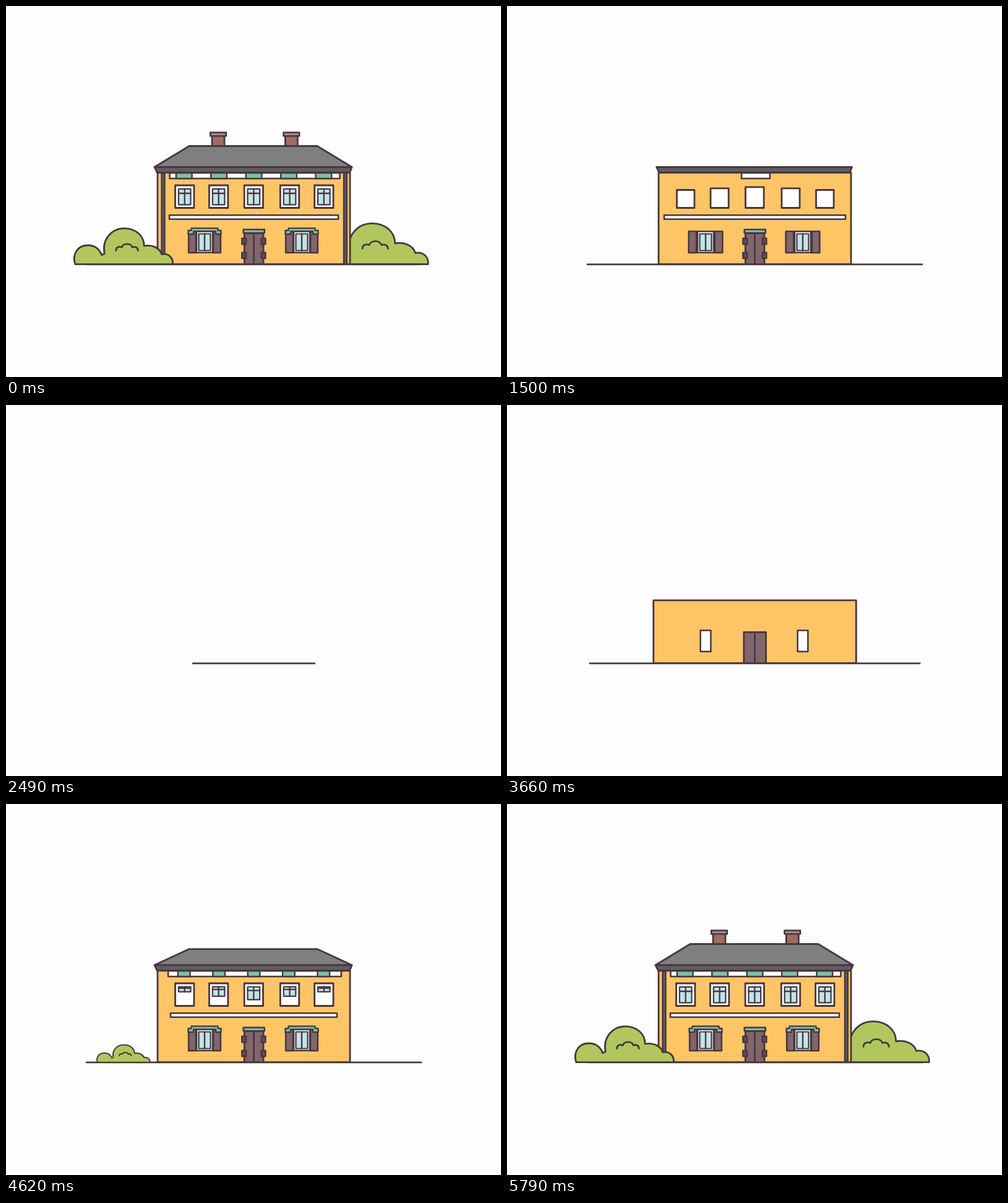
An HTML page with a canvas that plays this animation: 800 px wide and 600 px high, repeating every 5.82 s.

```html
<!DOCTYPE html>
<html lang="en">
<head>
<meta charset="utf-8">
<title>House</title>
<style>
  html, body { margin: 0; width: 100%; height: 100%; overflow: hidden; background: #fefefe; }
  canvas { display: block; width: 800px; height: 600px; }
</style>
</head>
<body>
<canvas id="stage" width="800" height="600"></canvas>
<script>
const ctx = document.getElementById('stage').getContext('2d');
const LOOP = 5820, FRAME = 30, LAST = LOOP - FRAME;
const MID = 400.5, GROUND = 417.7;
const C = {
  ink: '#463740', wall: '#fdc566', roof: '#7f7f7f', eave: '#615c61', white: '#fff',
  mint: '#7ac4a9', leaf: '#b1c75d', wood: '#83656c', iron: '#5e4b55',
  glass: '#c1e4e9', brick: '#a16d60', cap: '#a4878c'
};

// Easing
const clamp = u => Math.max(0, Math.min(1, u));
const sineOut = u => Math.sin(u * Math.PI / 2);
const sineInOut = u => (1 - Math.cos(u * Math.PI)) / 2;
const cubicInOut = u => u < .5 ? 4 * u ** 3 : 1 - 4 * (1 - u) ** 3;
const span = (t, from, to, ease = sineOut) => ease(clamp((t - from) / (to - from)));

// Steps [time, value]: a quick first move, then soft swings
function swing(t, ...steps) {
  if (t <= steps[0][0]) return steps[0][1];
  for (let i = 1; i < steps.length; i++) {
    const [t0, a] = steps[i - 1], [t1, b] = steps[i];
    if (t < t1) return a + (b - a) * span(t, t0, t1, i === 1 ? sineOut : sineInOut);
  }
  return steps[steps.length - 1][1];
}

// Drawing: the shape follows the transform, the line weight does not
function paint(fill, weight) {
  ctx.save();
  ctx.setTransform(1, 0, 0, 1, 0, 0);
  if (fill) { ctx.fillStyle = fill; ctx.fill(); }
  if (weight) { ctx.lineWidth = weight; ctx.stroke(); }
  ctx.restore();
}
function box(x0, y0, x1, y1, fill, weight = 2.8) {
  ctx.beginPath();
  ctx.rect(x0, y0, x1 - x0, y1 - y0);
  paint(fill, weight);
}
function poly(points, fill, weight = 2.8, open) {
  ctx.beginPath();
  points.forEach(([x, y]) => ctx.lineTo(x, y));
  if (!open) ctx.closePath();
  paint(fill, weight);
}
const line = (x0, y0, x1, y1, weight) => poly([[x0, y0], [x1, y1]], null, weight, true);
function grow(x, y, sx, sy, draw) {
  if (sx < .005 || sy < .005) return;
  ctx.save();
  ctx.translate(x, y);
  ctx.scale(sx, sy);
  ctx.translate(-x, -y);
  draw();
  ctx.restore();
}

// Bush around x = 0 on the ground line
function bush(x, size, sx, sy) {
  if (sx <= 0) return;
  const weight = 2.8 * Math.min(1, .4 + .6 * sx);
  ctx.save();
  ctx.translate(x, GROUND);
  ctx.scale(size * sx, size * sy);
  ctx.translate(-189.5, -GROUND);
  ctx.beginPath();
  ctx.moveTo(111.5, GROUND);
  ctx.bezierCurveTo(106, 400, 117, 387, 132, 387);
  ctx.bezierCurveTo(143, 387, 151, 393, 154.5, 402.8);
  ctx.lineTo(159, 400.5);
  ctx.bezierCurveTo(154.5, 378, 170, 359.6, 191, 359.6);
  ctx.bezierCurveTo(210, 359.6, 223, 372, 223, 388);
  ctx.bezierCurveTo(236, 385.5, 248, 391, 251.5, 401.5);
  ctx.bezierCurveTo(262, 399.5, 270.5, 407, 269.3, GROUND);
  ctx.closePath();
  paint(C.leaf, weight);
  ctx.beginPath();
  ctx.moveTo(177.5, 395.5);
  ctx.bezierCurveTo(177.5, 389.5, 183, 388.5, 187, 390.3);
  ctx.bezierCurveTo(189, 383, 202, 383, 204, 390.3);
  ctx.bezierCurveTo(209, 388.5, 213, 391, 213, 395.5);
  paint(null, weight);
  ctx.restore();
}

function walls(t) {
  const h = span(t, 3350, 3850, sineInOut);
  grow(MID, GROUND, 1 + .17 * (1 - h), h, () => box(245, 269.5, 556, GROUND, C.wall));
  return h;
}

function door(t, wallH) {
  const sx = swing(t, [3480, 0], [3650, 1.165], [3880, 1]);
  grow(MID, GROUND, sx, Math.min(1, wallH * 2.4), () => {
    box(385.3, 367.3, 416, GROUND, C.wood);
    line(MID, 367.3, MID, GROUND, 2.6);
  });
  grow(MID, 364, swing(t, [3850, 0], [4030, 1.08], [4200, 1]), 1,
    () => box(383.7, 361.5, 417.7, 367, C.mint, 2.6));
  const hinge = swing(t, [3950, 0], [4110, 1.1], [4230, 1]);
  for (const x of [384.7, 416])
    for (const y of [380.5, 403.3])
      grow(x, y, hinge, hinge, () => box(x - 3.4, y - 4.7, x + 3.4, y + 4.7, C.iron, 2.4));
}

function lowerWindow(x, t) {
  const shutters = swing(t, [3980, 0], [4230, 1.07], [4450, 1]);
  const frame = swing(t, [3600, 0], [3750, 1.08], [3900, 1]);
  grow(x, 382, shutters, 1, () => {
    box(x - 25.8, 364.5, x - 14, 399, C.wood, 2.6);
    box(x + 14, 364.5, x + 25.8, 399, C.wood, 2.6);
  });
  grow(x, 382, frame, 1, () => box(x - 13, 364.5, x + 13, 398.8, C.white, 2.5));
  grow(x, 369, 1, span(t, 3800, 4020), () => {
    box(x - 9.5, 368.5, x + 9.5, 395.5, C.glass, 2.2);
    line(x, 368.5, x, 395.5, 2.4);
  });
  const awning = swing(t, [4290, 0], [4480, 1.06], [4600, 1]);
  grow(x, 359, 1, awning, () => {
    const half = [[0, 359.3], [21.5, 359.3], [21.5, 363], [26.5, 363], [26.5, 369], [18, 369], [18, 364.3], [0, 364.3]];
    const left = half.map(([dx, y]) => [x - dx, y]);
    poly([...half.map(([dx, y]) => [x + dx, y]), ...left.reverse()], C.mint, 2.3);
  });
}

function upperWindow(x, rank, t) {
  const from = 4010 + 30 * rank;
  const sy = span(t, from, from + 375);
  grow(x, 326.5, .7 + .3 * sy, sy, () => box(x - 15.2, 290, x + 15.2, 326.5, C.white));
  const pane = 4470 + 50 * rank;
  grow(x, 295.5, 1, span(t, pane, pane + 250), () => {
    box(x - 9.8, 295.8, x + 9.8, 321.3, C.glass, 2.2);
    line(x, 295.8, x, 321.3, 2.3);
    line(x - 9.8, 303, x + 9.8, 303, 2.3);
  });
}

function trim(t) {
  grow(MID, 341, swing(t, [4000, 0], [4260, 1.075], [4600, .985], [4850, 1]), 1,
    () => box(264, 338.3, 537, 344.7, C.white, 2.6));
  grow(402, 274, swing(t, [4260, 0], [4540, 1.03], [4720, 1]), 1,
    () => box(264.5, 270, 539.5, 279, C.white, 2.6));
  const tile = span(t, 4510, 4710);
  for (let i = -2; i <= 2; i++) {
    const x = 400.5 + 56.4 * i;
    grow(x, 274, tile, 1, () => box(x - 12.8, 270, x + 12.8, 279, C.mint, 2.4));
  }
}

function pipes(t) {
  const sy = span(t, 4700, 4990);
  for (const x of [254, 548.4])
    grow(x, GROUND, 1, sy, () => box(x - 2.4, 270, x + 2.4, GROUND, C.eave, 2.5));
}

function roof(t) {
  grow(MID, 260.5, 1, span(t, 4290, 4890),
    () => poly([[240, 260.5], [296, 226.5], [503, 226.5], [559, 260.5]], C.roof));
  grow(MID, 269.5, .95 + .05 * span(t, 3830, 4600), swing(t, [3830, 0], [4060, 1.2], [4250, 1]),
    () => poly([[240, 260.5], [559, 260.5], [555.5, 269.5], [244.5, 269.5]], C.eave));
}

function chimney(x, t) {
  grow(x, 226.5, swing(t, [4810, 1], [5040, 1.14], [5280, 1]), span(t, 4810, 5040),
    () => box(x - 10, 206, x + 10, 226.5, C.brick));
  grow(x, 204.6, swing(t, [4970, 0], [5070, 1.07], [5280, 1]), .05 + .95 * span(t, 5060, 5300, sineInOut),
    () => box(x - 12.8, 204.5, x + 12.8, 210.2, C.cap, 2.6));
}

function groundLine(t) {
  const half = 270.5 * span(t, 2890, 3800, cubicInOut);
  if (half > .8) line(MID - half, GROUND + .2, MID + half, GROUND + .2, 2.7);
}

function draw(ms) {
  // Taking down is the building up, run backwards
  const t = Math.min(LAST, Math.max(ms, LAST - ms));
  ctx.fillStyle = '#fefefe';
  ctx.fillRect(0, 0, 800, 600);
  ctx.strokeStyle = C.ink;
  ctx.lineJoin = ctx.lineCap = 'round';

  bush(590, 1.155,
    swing(t, [4800, 0], [5080, 1.083], [5340, .965], [5600, 1]),
    .985 * swing(t, [4800, 0], [5040, 1.02], [5240, 1]));
  const wallH = walls(t);
  for (const x of [343, 461.3]) chimney(x, t);
  trim(t);
  [288.7, 343.6, 400.3, 458.5, 513.8].forEach((x, i) => upperWindow(x, Math.abs(i - 2), t));
  for (const x of [321, 478]) lowerWindow(x, t);
  door(t, wallH);
  pipes(t);
  roof(t);
  groundLine(t);
  bush(189.7, 1,
    swing(t, [4540, 0], [4790, 1.1], [5070, .956], [5330, 1.012], [5560, 1]),
    swing(t, [4540, 0], [4800, 1.03], [5000, 1]));
}

const start = performance.now();
function tick() {
  draw((performance.now() - start) % LOOP);
  requestAnimationFrame(tick);
}
tick();
</script>
</body>
</html>
```
